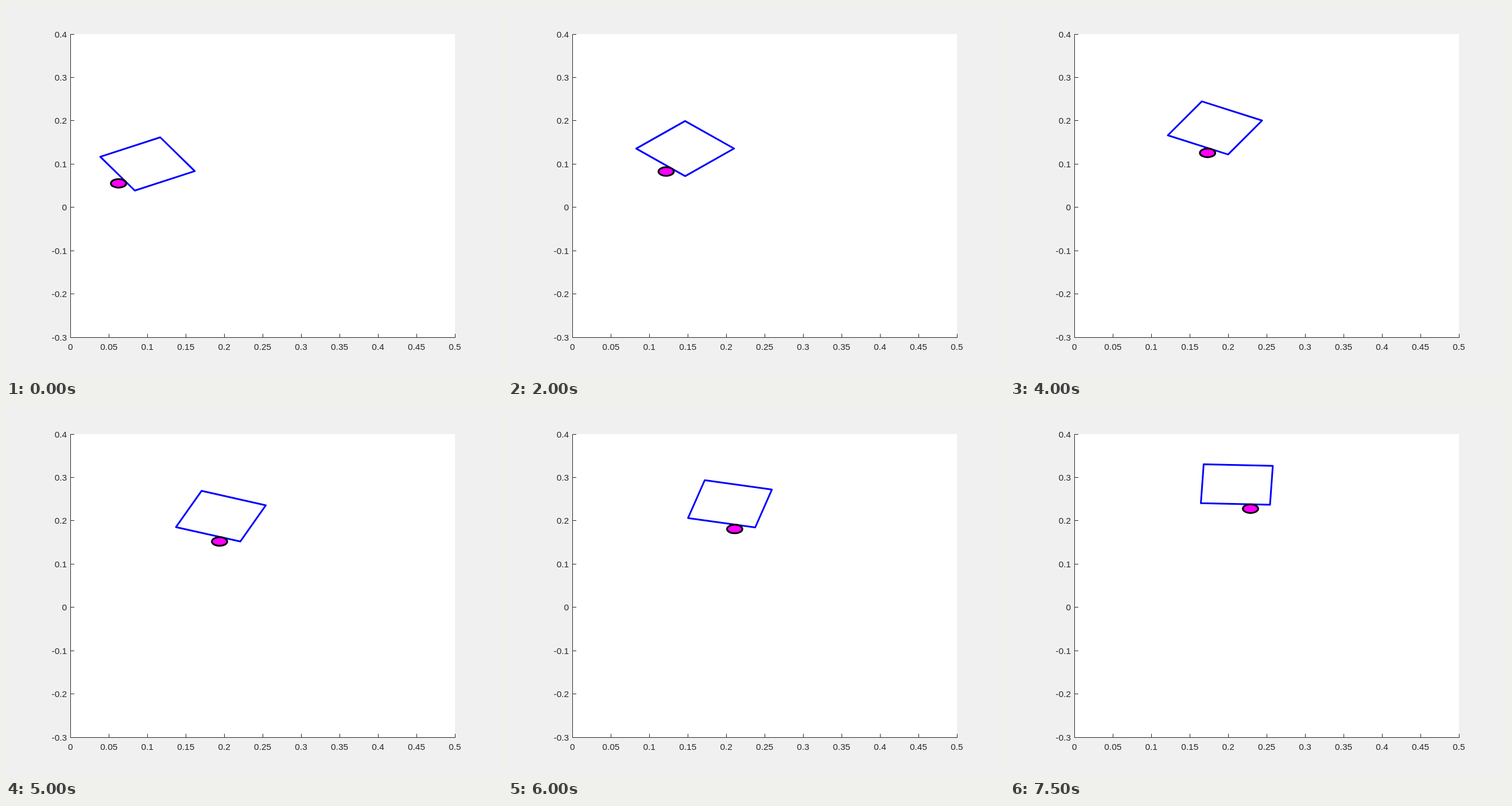
Animation, 864 px wide and 648 px high, one loop 8 s. Source, as an HTML page with a canvas:

```html
<!DOCTYPE html>
<html lang="en">
<head>
<meta charset="utf-8">
<title>Pushed square</title>
<style>
  html, body { margin: 0; width: 100%; height: 100%; overflow: hidden; background: #f0f0f0; }
  canvas, svg { position: absolute; left: 0; top: 0; display: block; }
  text { font: 15.43px "Liberation Sans", Arial, sans-serif; fill: #262626; }
</style>
</head>
<body>
<canvas id="stage" width="864" height="648"></canvas>
<svg id="labels" width="864" height="648"></svg>
<script>
const ctx = document.getElementById("stage").getContext("2d");
const labels = document.getElementById("labels");

const LOOP = 8000, STEP = 500;
const BOX = { left: 112.32, right: 781.92, top: 48.6, bottom: 576.72 };
const SX = (BOX.right - BOX.left) / 0.5;
const SY = (BOX.bottom - BOX.top) / 0.7;
const INK = "#262626";
const RAD = Math.PI / 180;

// The square is pushed along a circular arc.
const HALF = 0.045, TIP_R = 0.01, TIP_X = 0.02;
const ARC_R = 0.222, HEADING = 29.95, TURN = 7.75, LAG = 0.05;

const px = x => 112.6 + x * SX;
const py = y => 350.6 - y * SY;

const xTicks = Array.from({ length: 11 }, (_, i) => i / 20);
const yTicks = Array.from({ length: 8 }, (_, i) => (i - 3) / 10);
const tickX = x => Math.round(BOX.left + x * SX);
const tickY = y => Math.round(BOX.bottom - (y + 0.3) * SY);

function addLabel(value, x, y, anchor) {
  const el = document.createElementNS("http://www.w3.org/2000/svg", "text");
  el.setAttribute("x", x);
  el.setAttribute("y", y);
  el.setAttribute("text-anchor", anchor);
  el.textContent = String(value);
  labels.append(el);
}

function drawAxes() {
  ctx.fillStyle = "#f0f0f0";
  ctx.fillRect(0, 0, 864, 648);
  ctx.fillStyle = "#fff";
  ctx.fillRect(112, 49, 670, 528);
  ctx.fillStyle = INK;
  ctx.fillRect(112, 49, 1, 529);
  ctx.fillRect(112, 577, 671, 1);
  for (const x of xTicks) ctx.fillRect(tickX(x), 571, 1, 6);
  for (const y of yTicks) ctx.fillRect(113, tickY(y), 6, 1);
}

function pose(t) {
  const s = Math.max(0, t / 1000 - LAG);
  const a0 = HEADING * RAD;
  const a = (HEADING + TURN * s) * RAD;
  return {
    x: 0.1 + ARC_R * (Math.sin(a) - Math.sin(a0)),
    y: 0.1 + ARC_R * (Math.cos(a0) - Math.cos(a)),
    angle: a - Math.PI / 2
  };
}

// Body coordinates to pixels
function place(p, bx, by) {
  const c = Math.cos(p.angle), s = Math.sin(p.angle);
  return [px(p.x + bx * c - by * s), py(p.y + bx * s + by * c)];
}

function draw(t) {
  const p = pose(t);
  drawAxes();

  ctx.lineWidth = 3;
  ctx.lineJoin = "round";
  ctx.strokeStyle = "#00f";
  ctx.beginPath();
  for (const [u, v] of [[-1, -1], [1, -1], [1, 1], [-1, 1]]) {
    ctx.lineTo(...place(p, u * HALF, v * HALF));
  }
  ctx.closePath();
  ctx.stroke();

  const [cx, cy] = place(p, TIP_X, -HALF - TIP_R);
  ctx.beginPath();
  ctx.ellipse(cx, cy, TIP_R * SX, TIP_R * SY, 0, 0, 2 * Math.PI);
  ctx.fillStyle = "#f0f";
  ctx.fill();
  ctx.strokeStyle = "#000";
  ctx.stroke();
}

for (const x of xTicks) addLabel(x, BOX.left + x * SX, 598.6, "middle");
for (const y of yTicks) addLabel(y, 106.2, tickY(y) + 5.8, "end");

const start = performance.now();
function tick() {
  const t = (performance.now() - start) % LOOP;
  draw(Math.floor(t / STEP) * STEP);
  requestAnimationFrame(tick);
}
tick();
</script>
</body>
</html>
```
